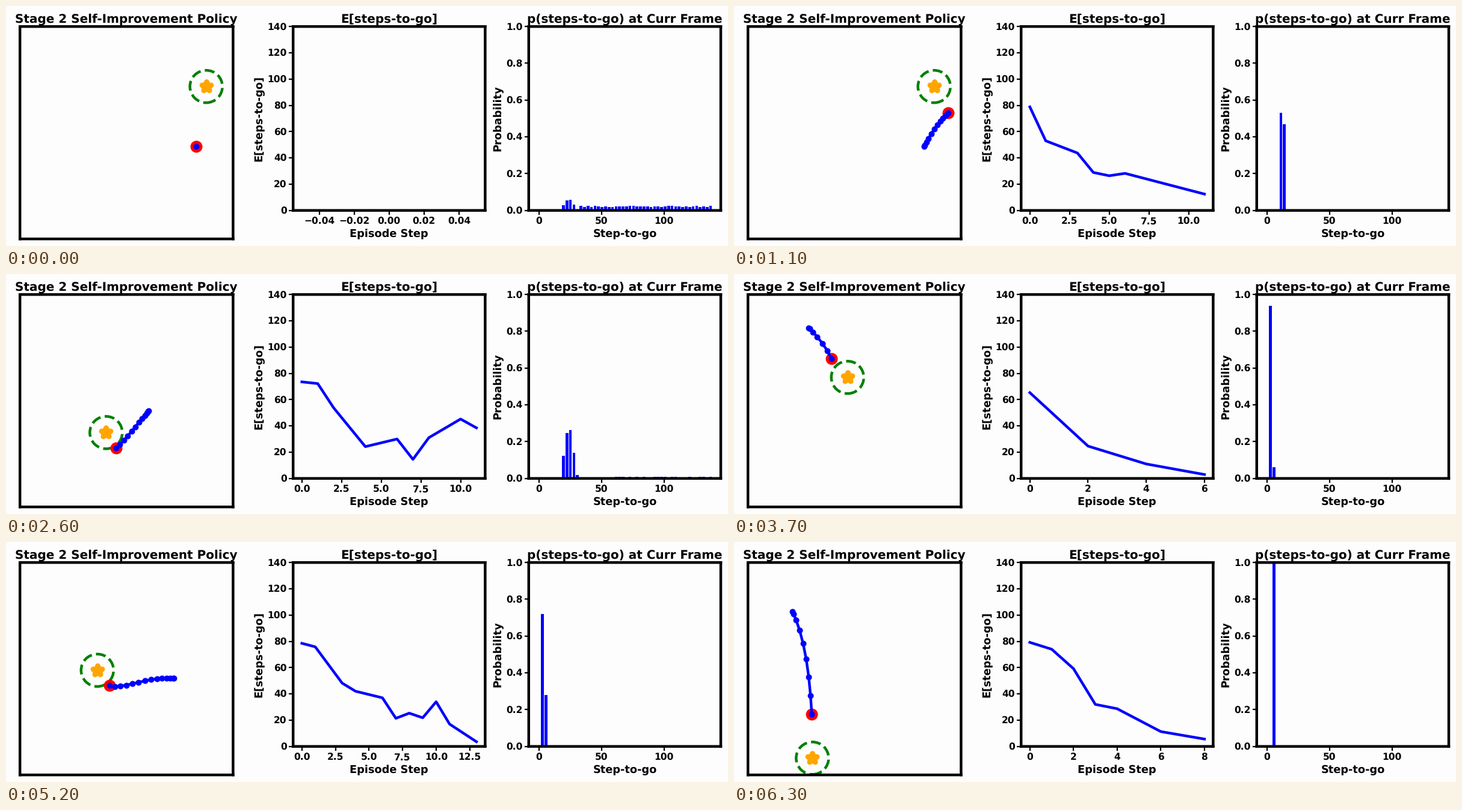
Write a matplotlib script that moves like this. It is 1200x400 px and loops after 6.4 s.

```python
import matplotlib.pyplot as plt
import numpy as np
from matplotlib.animation import FuncAnimation

W, H, DPI = 1200, 400, 80
PAPER = "#fdfdfd"
BIN, BINS = 2.8, 50

plt.rcParams.update({
    "font.family": "DejaVu Sans", "font.weight": "bold", "text.hinting": "none",
    "axes.titleweight": "bold", "axes.labelweight": "bold",
    "axes.titlesize": 18, "axes.labelsize": 16,
    "xtick.labelsize": 14, "ytick.labelsize": 14,
    "axes.linewidth": 4, "axes.facecolor": PAPER, "figure.facecolor": PAPER,
    "xtick.major.size": 6, "ytick.major.size": 6,
    "xtick.major.width": 2, "ytick.major.width": 2,
})


class Episode:
    """Goal, agent waypoints {step: (x, y)} and expected cost {step: value}."""

    def __init__(self, goal, waypoints, cost):
        self.goal = goal[0], H - goal[1]
        self.steps = np.arange(max(cost) + 1)
        self.path = self.glide(waypoints)
        self.cost = np.interp(self.steps, list(cost), list(cost.values()))

    def glide(self, waypoints):
        """Polynomial through the waypoints that leaves the first one at rest."""
        t = np.array(list(waypoints))[1:, None]
        points = np.array(list(waypoints.values()))
        powers = np.arange(len(t)) + 2.0
        coefs = np.linalg.solve(t ** powers, points[1:] - points[0])
        x, y = (points[0] + self.steps[:, None] ** powers @ coefs).T
        return x, H - y


EPISODES = [
    Episode((332.7, 134.2),
            {0: (316.5, 234.3), 3: (323.5, 220.5), 6: (338, 198.2), 14: (352, 165)},
            {0: 78.8, 1: 53, 3: 43.7, 4: 28.9, 5: 26.4, 6: 28.2, 14: 3}),
    Episode((166.3, 264.3),
            {0: (237.3, 228.3), 4: (226, 241), 11: (183, 289.5), 15: (157, 287)},
            {0: 73.5, 1: 72.2, 2: 53.8, 4: 24.2, 6: 30, 7: 14.5, 8: 31, 10: 45.2, 11: 38.5, 15: 3}),
    Episode((188.7, 172.3),
            {0: (124, 89.5), 3: (138.5, 105), 6: (162, 141)},
            {0: 65.3, 2: 24.6, 4: 11, 6: 2.97, 7: 1.5}),
    Episode((151.8, 213.8),
            {0: (279, 227), 4: (259.5, 227), 9: (210, 236.3), 13: (172, 239.3)},
            {0: 78.5, 1: 75.8, 3: 48.2, 4: 42, 6: 37, 7: 21.4, 8: 25.3, 9: 21.8, 10: 34, 11: 17, 13: 3.58, 15: 1.2}),
    Episode((130.3, 360.3),
            {0: (97, 116.2), 3: (109, 147), 5: (120, 195.2), 8: (129.3, 287)},
            {0: 79.2, 1: 74, 2: 59.2, 3: 32, 4: 28.7, 6: 11.3, 8: 5.6}),
]
TIMELINE = [(ep, step) for ep in EPISODES for step in ep.steps]
steps_to_go = np.arange(BINS) * BIN


def distribution(cost, seed):
    """A sharp peak when the goal is near; mass leaks to a far plateau when it is not."""
    near = min(cost, 24)
    spread = max(BIN, 0.3 * near)
    peak = np.clip(1 - abs(steps_to_go - near) / spread, 0, 1)
    noise = np.random.default_rng(seed).uniform(0.8, 1.2, BINS)
    plateau = noise * (steps_to_go > 90 - 0.75 * cost)
    far = np.clip((cost - 25) / 65, 0, 1)
    return (1 - far) * peak / peak.sum() + far * plateau / plateau.sum()


def panel(x0, x1, y0, y1, title, xlabel="", ylabel=""):
    ax = fig.add_axes([x0 / W, 1 - y1 / H, (x1 - x0) / W, (y1 - y0) / H])
    ax.set(title=title, xlabel=xlabel, ylabel=ylabel)
    for spine in ax.spines.values():
        spine.set_snap(False)
    return ax


fig = plt.figure(figsize=(W / DPI, H / DPI), dpi=DPI)
world = panel(23.2, 377.4, 34.2, 388.2, "Stage 2 Self-Improvement Policy")
curve = panel(477.2, 796.4, 34.2, 340.7, "E[steps-to-go]", "Episode Step", "E[steps-to-go]")
hist = panel(868.8, 1188, 34.2, 340.7, "p(steps-to-go) at Curr Frame", "Step-to-go", "Probability")

world.set(xlim=(23.2, 377.4), ylim=(H - 388.2, H - 34.2), xticks=[], yticks=[])
ring = world.add_patch(plt.Circle((0, 0), 27, fill=False, ec="green", lw=4, ls="--"))
star = world.scatter([0], [0], s=200, marker="*", color="orange", lw=8, zorder=3)
agent, = world.plot([], [], "o", color="red", ms=17)
trail, = world.plot([], [], "o-", color="blue", lw=4, ms=8)

curve.set_ylim(0, 140)
line, = curve.plot([], [], color="blue", lw=4)

bars = hist.bar(steps_to_go, np.zeros(BINS), width=0.8 * BIN, color="blue")
pad = 0.05 * BIN * (BINS - 0.2)
hist.set(xlim=(-0.4 * BIN - pad, BIN * (BINS - 0.6) + pad), ylim=(0, 1))


def draw(i):
    ep, step = TIMELINE[i]
    ring.center = ep.goal
    star.set_offsets([ep.goal])

    x, y = (row[:step + 1] for row in ep.path)
    trail.set_data(x, y)
    agent.set_data(x[-1:], y[-1:])

    line.set_data(ep.steps[:step + 1], ep.cost[:step + 1])
    margin = 0.05 * step if step else 0.055
    curve.set_xlim(-margin, step + margin)

    for bar, p in zip(bars, distribution(ep.cost[step], i)):
        bar.set_height(p)
    return ring, star, agent, trail, line, *bars


anim = FuncAnimation(fig, draw, frames=len(TIMELINE), init_func=lambda: draw(0),
                     interval=100, repeat=True, repeat_delay=0, blit=False)
plt.show()
```
